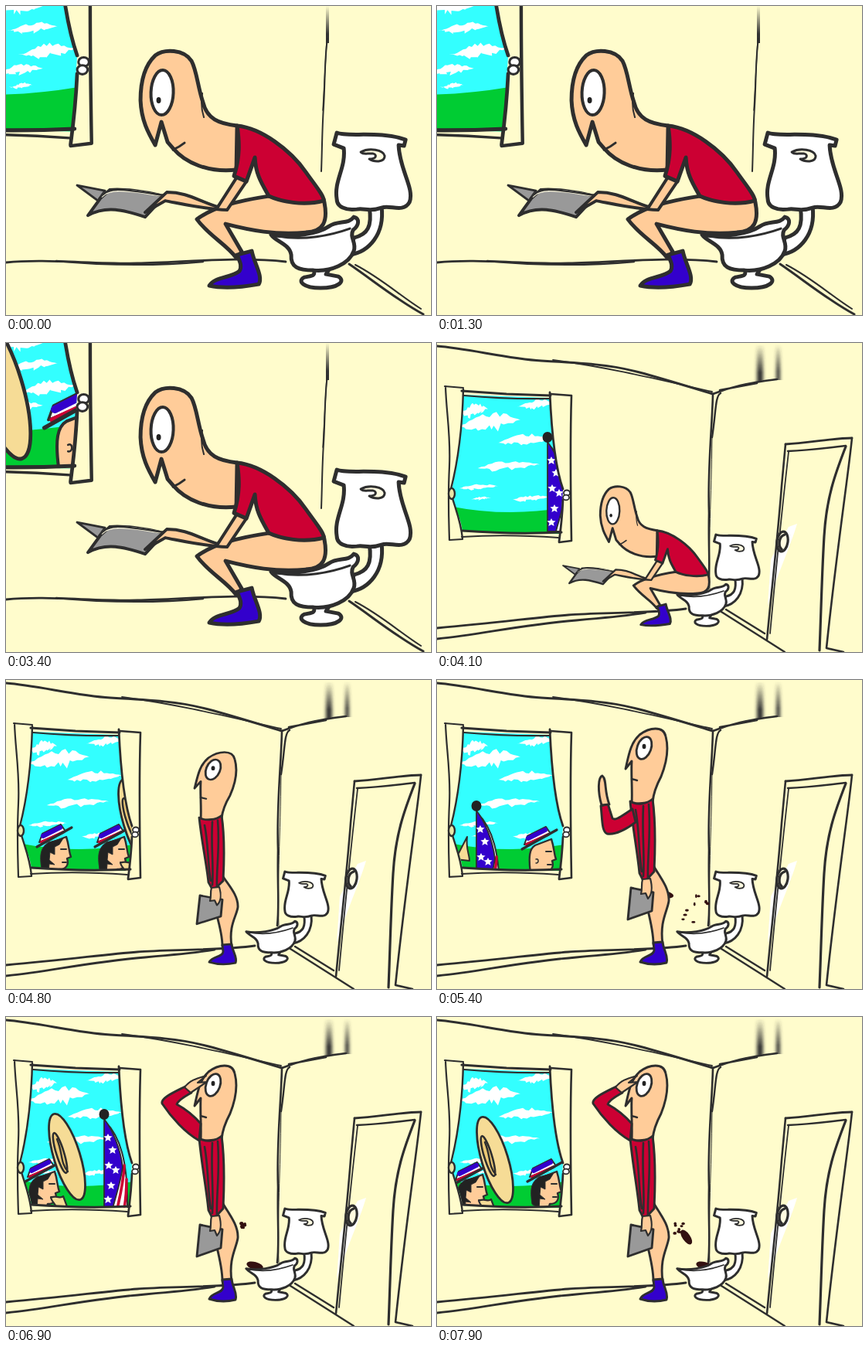
These frames come from a looping animation (550x400 px, 8000 ms). An HTML page:

```html
<!DOCTYPE html>
<html lang="en">
<head>
<meta charset="utf-8">
<title>Parade at the window</title>
<style>
html, body { margin: 0; width: 100%; height: 100%; overflow: hidden; background: #fffccc; }
svg { display: block; width: 550px; height: 400px; }
path, ellipse { stroke-linecap: round; stroke-linejoin: round; }
</style>
</head>
<body>
<svg id="stage" viewBox="0 0 550 400"></svg>
<script>
const INK = '#2e2e2e', SKIN = '#ffcc99', RED = '#cc0033', BLUE = '#3300cc', WALL = '#fffccc', BROWN = '#331111';

const shape = (d, fill = 'none', w = 2.9, ink = INK) =>
  `<path d="${d}" fill="${fill}" stroke="${w ? ink : 'none'}" stroke-width="${w}"/>`;
const line = (d, w = 2, ink = INK) => shape(d, 'none', w, ink);
const oval = (x, y, rx, ry, fill, w = 0, turn = 0) =>
  `<ellipse cx="${x}" cy="${y}" rx="${rx}" ry="${ry}" fill="${fill}" stroke="${INK}" stroke-width="${w}" transform="rotate(${turn} ${x} ${y})"/>`;
const group = (id, body, extra = '') => `<g id="${id}" ${extra}>${body}</g>`;

function random(seed) {
  return () => (seed = (seed * 16807) % 2147483647) / 2147483647;
}

// Ragged streak of cloud, rising to the right
function cloud(x, y, w, h) {
  const r = random(x * 91 + y * 17 + w), n = 18, top = [], low = [];
  for (let i = 0; i <= n; i++) {
    const u = i / n, px = x + u * w, mid = y - u * h * 0.3, puff = Math.sin(Math.PI * u) * h * 0.5;
    top.push(`${px.toFixed(1)},${(mid - puff * (0.5 + 0.6 * r())).toFixed(1)}`);
    low.unshift(`${(px - 4 * r()).toFixed(1)},${(mid + puff * (0.1 + 0.9 * r())).toFixed(1)}`);
  }
  return shape('M' + top.concat(low).join(' ') + 'Z', '#fff', 0);
}

const GLASS = 'M34 67L146 71C148 110 153 158 163 190L159 247L33 244C31 222 17 205 19 190C27 160 31 110 34 67Z';

const sky = shape(GLASS, '#33ffff', 0) + '<g clip-path="url(#glass)">' +
  group('farClouds',
    cloud(28, 108, 80, 28) + cloud(30, 92, 36, 22) + cloud(80, 129, 70, 17) + cloud(106, 82, 50, 14) +
    cloud(53, 162, 80, 16) + cloud(29, 188, 50, 9) + cloud(98, 203, 50, 10) + cloud(46, 202, 24, 5)) +
  group('nearClouds',
    cloud(100, 155, 38, 12) + cloud(112, 170, 36, 10) + cloud(122, 188, 40, 13) +
    cloud(104, 202, 33, 10) + cloud(114, 213, 15, 5)) +
  shape('M16 211Q90 226 165 213V250H16Z', '#00cc33', 0) + group('parade', '') + '</g>';

const windowFrame =
  shape('M11 56L34 58C33 100 28 150 19 188C18 212 30 225 33 254L16 255Z', WALL, 0) +
  shape('M146 66L174 68V256L158 258C160 240 162 222 163 203V188C152 155 148 110 146 66Z', WALL, 0) +
  line('M10 56L34 58M11 56C12 90 18 120 16 160S15 220 16 255L33 254', 2.2) +
  line('M34 60C33 100 28 150 18 189M20 201C25 218 31 232 33 253', 2.4) +
  line('M32 62L90 66L147 68', 3) + line('M35 68Q90 73 146 72', 2.2) +
  line('M147 66L174 68C172 130 173 200 174 256L158 258', 2.6) +
  line('M146 64C148 110 152 158 163 189M163 203C162 225 160 242 158 257', 2.8) +
  line('M33 243Q100 248 161 245', 3) + line('M32 251Q90 247 157 252', 2) +
  oval(19, 195, 4, 7, '#e8e6a8', 2.4) + oval(168, 194, 4, 3.5, '#fff', 1.8) + oval(167, 200, 4, 3.4, '#fff', 1.8);

const wideRoom =
  line('M0 4C40 7 90 20 135 23C190 26 225 28 262 38S330 58 357 66', 3) +
  line('M150 22C220 31 290 48 356 63', 1.8) +
  line('M357 66C380 57 400 52 440 47M366 61L414 52', 2.6) +
  line('M357 67C356 110 350 160 352 220C351 270 354 290 351 318', 2.6) +
  line('M367 65C360 68 361 90 356 122', 2.4) + line('M356 122C355 200 351 260 353 318', 1) +
  line('M0 369C80 362 130 355 170 352S280 350 322 344', 2.8) +
  line('M0 383C60 377 100 366 180 359S240 353 270 349', 2.8) +
  line('M368 348L428 386L450 400M374 345L424 376', 2.4) +
  shape('M455 238L466 234C455 270 440 300 428 340L432 280Z', '#fff', 0) +
  line('M427 384C434 310 442 240 446 185L451 131', 2.6) +
  line('M431 376C437 310 446 220 455 141', 1.8) +
  line('M451 131C480 130 510 123 537 123', 2.8) + line('M454 140C480 139 505 136 529 133', 2.4) +
  line('M537 123C533 165 517 270 504 395L526 400', 2.6) +
  line('M529 134C515 170 504 200 501 250S497 350 495 398', 3.2) +
  oval(447, 257, 7, 13, '#fffbe0', 3.2, 8) + line('M450 248C441 251 442 264 446 267', 3.4) +
  '<g filter="url(#smear)"><rect x="414" y="2" width="8" height="48" fill="url(#fade)"/>' +
  '<rect x="439" y="2" width="5" height="46" fill="url(#fade)"/></g>';

const nearRoom =
  '<rect x="414" y="0" width="4" height="48" fill="url(#fade)"/>' +
  line('M416 42C412 70 413 100 411 130C409 160 409 190 408 214', 2) + line('M415 45L410 135', 1.4) +
  line('M0 332C50 327 110 334 170 333S300 324 362 331', 2.8) +
  line('M65 330C130 336 200 336 255 331', 2.4) +
  line('M444 334C475 355 505 380 540 399', 3) + line('M452 335C485 352 510 375 537 392', 2);

// Toilet and seated figure are laid out at close-up scale
const toilet =
  shape('M470 260C474 285 468 296 450 300L445 322C470 318 490 295 486 260Z', '#fff', 5) +
  shape('M398 340C401 350 396 349 386 351C376 356 385 365 407 365C430 365 440 356 430 350L414 347L420 338Z', '#fff', 5) +
  shape('M343 296C370 301 405 294 418 285C430 277 443 283 450 273C458 275 457 284 449 290C444 300 454 306 450 317C444 334 420 344 398 342C378 342 368 338 369 322C367 308 349 305 343 296Z', '#fff', 5) +
  line('M352 298C385 304 420 297 445 288', 3) +
  shape('M428 164C440 170 485 161 517 173L515 181L508 180C509 212 529 236 522 254C514 268 497 257 486 261C470 267 464 261 454 263C440 265 428 260 428 250C424 226 440 210 437 184L424 179Z', '#fff', 5) +
  shape('M459 189C470 183 488 186 490 194C490 203 476 202 470 198C480 198 480 192 475 191C468 190 463 193 459 189Z', '#fffbe0', 3);

const sitter =
  shape('M247 276C268 260 300 252 340 246L411 250C418 280 410 292 388 293C350 297 315 290 284 282L305 318L298 326C285 308 262 297 247 276Z', SKIN, 5) +
  shape('M299 322L318 317C321 333 333 350 327 360C305 364 282 366 263 362C270 350 292 352 302 343C306 336 302 330 299 322Z', BLUE, 5) +
  shape('M92 232L128 239L119 252Z', '#999', 3) +
  shape('M122 249L106 271C130 258 152 264 180 273L205 246C180 240 150 236 134 238Z', '#999', 4) +
  line('M124 246C130 240 140 238 152 239C175 240 185 243 201 245', 3, '#fffbe0') +
  line('M120 250C132 233 145 236 204 245', 2.5) +
  shape('M299 221L274 260C248 252 235 241 208 241L180 267L206 252C232 257 258 263 286 264L311 227Z', SKIN, 4) +
  shape('M299 155C275 152 260 146 255 125C248 105 247 84 240 71C230 56 205 55 193 64C178 78 174 100 174 122C175 148 184 164 193 180L201 150L209 176L216 184C232 203 262 216 298 212Z', SKIN, 5) +
  line('M254 113C252 125 253 135 256 144', 2) +
  oval(202, 112, 14.5, 29, '#fff', 4, 2) + oval(197.5, 122, 3, 4, '#222') + line('M216 186C223 183 226 181 231 177', 3) +
  shape('M299 155C330 158 368 186 388 215C400 232 412 246 411 252C385 259 355 253 340 246C331 230 323 218 322 196L311 227L295 220C303 195 302 175 299 155Z', RED, 5);

const stander =
  shape('M280 240C286 252 301 268 300 286C298 300 288 312 292 342L280 342C280 322 274 304 269 282L268 252Z', SKIN) +
  shape('M280 340L292 339C293 350 300 358 297 366C285 369 272 368 263 365C267 356 280 358 281 350Z', BLUE) +
  shape('M252 161C253 140 251 122 252 105L244 115C248 98 250 82 262 71C275 61 293 59 296 73C301 92 296 110 290 125C283 138 280 148 279 158Z', SKIN) +
  oval(268, 88, 9, 15, '#fff', 2.8, 20) + oval(268, 86, 2.4, 3.2, '#222') + line('M252 128L259 130', 2.4) +
  shape('M250 157C260 163 272 160 279 154C284 190 282 225 281 248L268 262L262 250C259 220 253 190 250 157Z', RED) +
  line('M257 168C262 195 261 225 265 248M267 163C265 200 269 225 267 254M274 161C277 200 272 230 273 258', 2.6) +
  shape('M251 269L280 275L278 299L247 310Z', '#999') +
  shape('M266 258L276 257C279 268 278 278 273 283L270 276L264 277C266 270 264 265 266 258Z', SKIN, 2.2) +
  group('raised',
    shape('M253 167C240 175 231 183 227 179L221 160L212 163C214 180 213 196 220 199C232 201 248 191 257 184Z', RED) +
    shape('M213 162C208 145 208 126 214 124C220 129 216 143 223 161Z', SKIN)) +
  group('salute',
    shape('M250 160C232 150 214 130 202 112C200 105 216 98 232 90L240 98C229 104 222 110 221 113C234 120 245 130 252 138Z', RED) +
    shape('M231 91C238 82 245 80 259 76L248 85L260 84L239 98Z', SKIN, 2.2));

// Marchers, drawn around a head centre at (0, 0)
const hat = shape('M-22 -15L-18 -26L6 -38L12 -29Z', '#fff', 2) +
  line('M-17 -23L5 -34', 6, BLUE) + line('M-19 -15L9 -28', 4, RED) + line('M-25 -9L20 -34', 3.2);
const face = (hair) =>
  shape('M-14 22C-17 0 -15 -10 -8 -14L13 -22C17 -10 16 -4 19 4L14 6C17 15 12 20 4 20L2 26H-14Z', SKIN, 2.4) +
  line('M6 -6H13M8 11H13', 2) +
  (hair ? shape('M-19 20C-22 0 -20 -8 -10 -15L9 -20L4 -12L-2 -9V1L-8 -2L-9 8L-2 14L-9 13L-10 26Z', '#222', 1) : line('M-7 4C-3 2 -3 10 -7 9', 1.5));
const bell = shape('M8 12C16 8 20 14 24 10L30 26H16C14 20 10 18 8 12Z', '#f6dc96', 2.2) +
  oval(29, -41, 17, 58, '#f6dc96', 2.8, -17) + oval(20, -46, 5, 27, '#ecc975', 2.6, -17) + line('M16 -64C24 -44 20 -34 30 -22', 2.4);
const star = (x, y) => shape(`M${x} ${y - 5}l1.6 3 4 .4-3 2.6 1 4-3.6-2-3.6 2 1-4-3-2.6 4-.4Z`, '#fff', 0);
const flag =
  shape('M2 10C20 28 31 60 30 122H4Z', '#fff', 2) +
  line('M26 66C25 88 21 104 17 122M29 84C29 98 28 110 26 122', 3.6, RED) +
  shape('M0 6C11 20 21 44 24 68C21 90 15 106 11 122H0Z', BLUE, 1.8) +
  star(5, 30) + star(11, 46) + star(6, 66) + star(15, 72) + star(9, 92) + star(5, 110) + oval(0, 0, 6.5, 7, '#222');
const horn = shape('M-10 14L5 -15C3 0 8 8 8 16Z', '#f6dc96', 2);

const kinds = {
  bare: `<g transform="scale(.9)">${face(true)}</g>`,
  man: face(false) + hat,
  dark: face(true) + hat,
  tuba: face(true) + hat + bell,
  flag, horn
};
const SPEED = 0.25;
// kind, a time, the place at that time
const marchers = [
  ['bare', 2500, 119, 231], ['dark', 2500, 28, 225], ['man', 2500, -62, 225], ['tuba', 2500, -150, 225],
  ['flag', 4100, 143, 122], ['tuba', 5400, 290, 225], ['dark', 5400, 215, 225], ['man', 5400, 135, 228],
  ['flag', 5400, 51, 163], ['horn', 5400, 34, 218], ['dark', 5400, -18, 225],
  ['tuba', 6300, 118, 230], ['man', 6300, 52, 222], ['flag', 6900, 127, 126], ['tuba', 6900, 50, 222],
  ['man', 6900, -32, 225], ['dark', 7900, 142, 222], ['tuba', 7900, 46, 226]
];

const drops = [[5350, 335], [5750, 342], [6100, 322], [6950, 330], [7200, 346], [7500, 342]];
const sprays = [5100, 6850, 7800];

const stage = document.getElementById('stage');
stage.innerHTML = `<defs>
  <clipPath id="glass"><path d="${GLASS}"/></clipPath>
  <linearGradient id="fade" x2="0" y2="1"><stop offset="0" stop-color="#333" stop-opacity="0"/><stop offset=".75" stop-color="#333"/></linearGradient>
  <filter id="smear" x="-50%" width="200%"><feGaussianBlur stdDeviation="2 .5"/></filter></defs>
  <rect width="550" height="400" fill="${WALL}"/>` +
  group('wide', wideRoom) + group('near', nearRoom) +
  group('camera', sky + windowFrame + group('mess', '') +
    group('props', toilet + group('sitter', sitter), 'transform="matrix(.589 0 0 .589 108.8 151.4)"') +
    group('stander', stander));

const $ = (id) => document.getElementById(id);
const show = (id, on) => { $(id).style.display = on ? '' : 'none'; };
const clamp = (v) => Math.max(0, Math.min(1, v));

function paradeAt(t) {
  return marchers.map(([kind, at, x0, y]) => {
    const x = x0 + (t - at) * SPEED;
    return x > -60 && x < 200 ? `<g transform="translate(${x} ${y})">${kinds[kind]}</g>` : '';
  }).join('');
}

function dropAt(k, land) {
  if (k <= 0 || k > 900) return '';
  if (k < 300) {
    const out = clamp(k / 200);
    return oval(290 + 21 * out, 277 + 3 * out, 11, 4.5, BROWN, 0, 10);
  }
  if (k < 600) {
    const f = (k - 300) / 300;
    return oval(313 + (land - 313) * f, 281 + 36 * f * f, 14 - 9 * f, 5, BROWN, 0, 30 + 75 * f);
  }
  return oval(land, 322, 11, 5, BROWN, 0, 15);
}

function sprayAt(k, seed) {
  if (k <= 0 || k > 450) return '';
  const r = random(seed);
  let out = '';
  for (let i = 0; i < 9; i++) {
    const x = 302 + (0.05 + 0.12 * r()) * k, y = 268 + (0.13 * r() - 0.03) * k + 0.0002 * k * k;
    out += oval(x, y, 1.3 + 1.5 * r(), 1.3 + 1.2 * r(), BROWN);
  }
  return out;
}

function draw(now) {
  const t = Math.floor((now % 8000) / 100) * 100;
  const close = t < 3800, sitting = t < 4700;
  show('near', close);
  show('nearClouds', close);
  show('wide', !close);
  show('farClouds', !close);
  $('camera').setAttribute('transform', close ? 'matrix(1.698 0 0 1.698 -184.7 -257)' : '');
  $('parade').innerHTML = paradeAt(t);

  show('sitter', sitting);
  show('stander', !sitting);
  const rise = 0.7 + 0.3 * clamp((t - 4600) / 300);
  $('stander').setAttribute('transform', `translate(0 ${368 * (1 - rise)}) scale(1 ${rise})`);
  show('raised', t >= 5000 && t < 5600);
  show('salute', t >= 5600);
  const swing = 25 * clamp((t - 5400) / 200) - 70 * clamp((5400 - t) / 400);
  $('raised').setAttribute('transform', `rotate(${swing} 254 175)`);

  $('mess').innerHTML = drops.map(([at, land]) => dropAt(t - at, land)).join('') +
    sprays.map((at) => sprayAt(t - at, at)).join('');
}

const start = performance.now();
function tick() {
  draw(performance.now() - start);
  requestAnimationFrame(tick);
}
tick();
</script>
</body>
</html>
```
